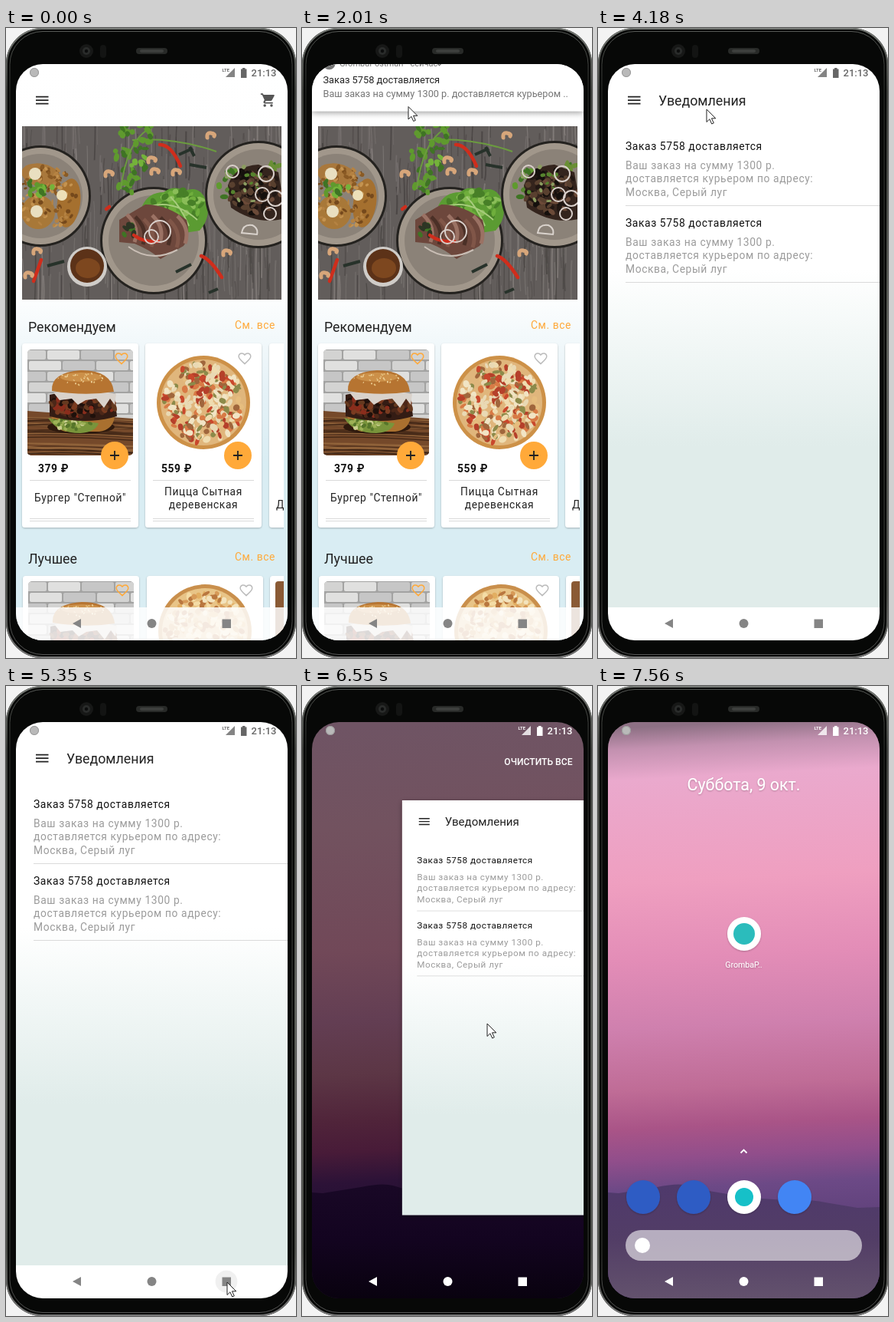
An HTML page for the animation above (8000 ms loop, 379 px wide and 821 px high).

```html
<!DOCTYPE html>
<html lang="ru">
<head>
<meta charset="utf-8">
<style>
html, body { margin: 0; width: 100%; height: 100%; overflow: hidden; background: #f3f3f3 }
svg { display: block; font-family: Roboto, sans-serif }
.body { font-size: 13.8px; letter-spacing: .62px }
.head { font-size: 17.8px }
.mid { text-anchor: middle }
</style>
</head>
<body>
<svg id="stage" width="379" height="821" viewBox="0 0 379 821"></svg>
<script>
let seed = 7;
const rnd = (a, b) => a + (b - a) * (seed = seed * 16807 % 2147483647) / 2147483647;
const pick = list => list[Math.floor(rnd(0, list.length))];
const many = (n, f) => Array.from({ length: n }, (_, i) => f(i)).join('');
const rect = (x, y, w, h, fill, more = '') => `<rect x="${x}" y="${y}" width="${w}" height="${h}" fill="${fill}" ${more}/>`;
const dot = (x, y, r, fill, more = '') => `<circle cx="${x}" cy="${y}" r="${r}" fill="${fill}" ${more}/>`;
const oval = (x, y, rx, ry, fill, turn = 0) => `<ellipse rx="${rx}" ry="${ry}" fill="${fill}" transform="translate(${x} ${y}) rotate(${turn})"/>`;
const path = (d, fill, more = '') => `<path d="${d}" fill="${fill}" ${more}/>`;
const line = (d, color, w = 1, more = '') => path(d, 'none', `stroke="${color}" stroke-width="${w}" ${more}`);
const text = (x, y, s, cls, fill, more = '') => `<text x="${x}" y="${y}" class="${cls}" fill="${fill}" ${more}>${s}</text>`;
const fade = (id, y1, y2, tilt, ...stops) => `<linearGradient id="${id}" gradientUnits="userSpaceOnUse" x1="0" x2="0" y1="${y1}" y2="${y2}" gradientTransform="rotate(${tilt} 190 420)">` +
  stops.map(([y, c]) => `<stop offset="${(y - y1) / (y2 - y1)}" stop-color="${c}"/>`).join('') + '</linearGradient>';
const group = (id, s, more = '') => `<g id="${id}" ${more}>${s}</g>`;
// Small flecks spread over a disc
const scatter = (n, x, y, rx, ry, size, colors) => many(n, () => {
  const a = rnd(0, 6.283), r = Math.sqrt(rnd(0, 1));
  return oval(x + rx * r * Math.cos(a), y + ry * r * Math.sin(a), rnd(.5, 1) * size, rnd(.3, .7) * size, pick(colors), rnd(0, 180));
});

const orange = '#ffa939', round = 'stroke-linecap="round"';

const defs = `<defs>
${fade('homeBg', 47, 798, 0, [47, '#fff'], [350, '#fdfefe'], [470, '#e6f2f7'], [570, '#d9edf3'], [798, '#d9edf3'])}
${fade('pageBg', 47, 755, 0, [47, '#fff'], [315, '#fff'], [400, '#f3f8f7'], [545, '#e0ecea'], [755, '#e0ecea'])}
${fade('dusk', 47, 798, -3, [47, '#6f5464'], [180, '#72525f'], [340, '#714858'], [430, '#633e53'], [500, '#5c3645'], [560, '#50243a'], [600, '#481b38'], [640, '#2c1237'], [680, '#231033'])}
${fade('duskHill', 648, 798, 0, [648, '#190826'], [720, '#130420'], [798, '#09020f'])}
${fade('dawn', 47, 798, -3, [47, '#8d7084'], [75, '#c391b0'], [115, '#eaa9cd'], [250, '#ef9fc0'], [350, '#e38db7'], [440, '#cf80ae'], [520, '#bf6c96'], [570, '#a95487'], [610, '#914e8b'], [650, '#6c4986'], [690, '#62437d'])}
${fade('dawnHill', 648, 798, 0, [648, '#4f396c'], [720, '#523d66'], [798, '#63526d'])}
<linearGradient id="metal" x1="0" x2="0" y1="0" y2="1"><stop offset="0" stop-color="#777a76"/><stop offset=".1" stop-color="#3b3d39"/><stop offset=".5" stop-color="#5d605a"/><stop offset=".9" stop-color="#4a4c47"/><stop offset="1" stop-color="#777"/></linearGradient>
<clipPath id="screenClip"><rect x="13" y="47" width="355" height="751" rx="35"/></clipPath>
<clipPath id="listClip"><rect x="13" y="47" width="350" height="751"/></clipPath>
<clipPath id="heroClip"><rect x="21" y="128" width="339" height="226"/></clipPath>
<clipPath id="photoClip"><rect x="28" y="419" width="138" height="138" rx="5"/></clipPath>
<clipPath id="navClip"><rect x="13" y="755" width="355" height="43"/></clipPath>
<clipPath id="crop"><rect id="cropBox" x="13" width="355"/></clipPath>
<filter id="soft" x="-20%" y="-20%" width="140%" height="140%"><feDropShadow dx="0" dy="1" stdDeviation="1.2" flood-opacity=".25"/></filter>
<filter id="deep" x="-20%" y="-20%" width="140%" height="140%"><feDropShadow dx="0" dy="2" stdDeviation="4" flood-opacity=".4"/></filter>
</defs>`;

// Hero picture
const plate = (x, y, r) => dot(x, y, r, '#24221f') + dot(x, y, r - 3, '#a1978b') + dot(x, y, r - 11, '#8b8278');
const cashew = (x, y) => line(`M${x - 4} ${y + 3}q-1-7 5-6t4 4`, '#d7a67a', 5, round);
const chili = d => line(d, '#cf2d1c', 4.5, round);
const leaf = (x, y, c = '#5f9a2e') => many(8, i => oval(x + rnd(-10, 10), y + rnd(-8, 8), rnd(3, 6), rnd(2, 4), i % 3 ? c : '#3f7424', i * 40));
const ring = (x, y, r) => dot(x, y, r, 'none', 'stroke="#d9cfca" stroke-width="2"');
const hero = `<g clip-path="url(#heroClip)">${rect(21, 128, 339, 226, '#625d5b')}
${many(260, () => line(`M${rnd(21, 360)} ${rnd(100, 340)}q${rnd(-3, 3)} 20 0 ${rnd(20, 90)}`, pick(['#413d3b', '#4d4846', '#7a7472', '#8a8481']), rnd(.6, 2.2), 'opacity=".65"'))}
${plate(45, 219, 66)}${oval(46, 192, 26, 15, '#a9783c', 12)}${oval(42, 240, 22, 22, '#a87838', 20)}${oval(82, 228, 15, 32, '#a5702f', 8)}
${scatter(110, 55, 222, 38, 42, 4, ['#8a5a24', '#c49350', '#b58242', '#75491c'])}
${leaf(40, 208)}${leaf(52, 212, '#74b23a')}${dot(38, 190, 8, '#e9dfc0')}${dot(40, 239, 8, '#e9dfc0')}${dot(73, 218, 7, '#ede0b8')}
${plate(193, 277, 70)}
${path('M178 232q8-18 28-18q12-10 28-2q22-8 29 18q4 18-10 34l-26 4z', '#5b9b32')}${scatter(50, 225, 232, 34, 20, 7, ['#6fae3c', '#8abd58', '#477f27'])}${line('M190 232q30-8 60 18M215 220q14 14 24 38', '#a6cc7b', 2)}
${path('M148 250l34-20q28 0 54 20q6 22-4 34l-30 17q-14-12-34-20l-20-2z', '#6d473c')}
${many(7, i => line(`M${158 + i * 11} ${243 + i * 3 % 8}q17 16 10 36`, ['#9b7264', '#4b3027', '#805648'][i % 3], 5))}
${leaf(158, 262, '#2d3524')}${chili('M167 270q14 10 32 8')}${ring(201, 265, 14)}${ring(190, 272, 9)}${line('M160 285q30 22 64 4', '#c9beb5', 2)}
${plate(330, 217, 70)}
${leaf(292, 195)}${leaf(288, 213)}${leaf(347, 186, '#6a8f35')}${path('M290 205q8-25 40-27l26 10l10 60q-38 10-72-14z', '#34241d')}
${scatter(90, 327, 212, 36, 30, 6, ['#59402f', '#211713', '#6b4a38', '#15100d'])}${scatter(18, 310, 205, 30, 24, 4, ['#56832e', '#8b9c60'])}
${ring(340, 190, 10)}${ring(335, 217, 9)}${ring(352, 222, 10)}${ring(296, 187, 8)}${ring(345, 242, 8)}${path('M308 267q2-12 14-10q8 4 6 12z', 'none', 'stroke="#d9d2cc" stroke-width="2"')}
${dot(106, 311, 26, '#cfccc8')}${dot(106, 310, 22, '#5c3218')}${oval(107, 313, 16, 13, '#7d471f')}
${leaf(153, 163)}${leaf(162, 188)}${leaf(174, 176, '#74b23a')}${leaf(156, 207)}${line('M150 210q8-62 36-78M165 146q55-4 110 15', '#6b9b3f', 2)}${leaf(157, 134)}${leaf(178, 152)}${leaf(182, 134)}
${chili('M201 152q15 0 27 28')}${chili('M255 297q12 4 27 28')}${chili('M46 302l-10 28')}${chili('M131 236l4-3')}
${line('M226 165l18-8M240 155l6 12M240 178l22 4M222 318l20-10M265 345l12-5M54 310l22-6', '#27322a', 4)}
${cashew(267, 140)}${cashew(222, 188)}${cashew(194, 187)}${cashew(190, 172)}${cashew(288, 293)}${cashew(40, 291)}${cashew(29, 322)}${cashew(134, 190)}</g>`;

// Dishes
const burger = `<g clip-path="url(#photoClip)">${rect(28, 419, 138, 138, '#a3a3a2')}
${many(28, i => { const row = i >> 2; return rect(10 + (i & 3) * 44 + row % 2 * 20, 420 + row * 14, 42, 12, ['#d3d3d2', '#e0e0df', '#c6c6c6'][i % 3], 'rx="2"'); })}
${path('M28 499l138 10v48h-138z', '#75492a')}${many(30, () => line(`M28 ${rnd(506, 556)}q60 ${rnd(-5, 5)} 138 4`, pick(['#4f301c', '#94663c', '#3f2515']), 1.3))}
${oval(98, 520, 44, 9, '#2e190d')}${path('M59 503h83q0 20-20 23h-44q-18-4-19-23z', '#a9702f')}
${path('M55 508q20 6 36 3l30 4q-4 12-24 13q-30 0-42-20z', '#79943b')}${scatter(30, 85, 516, 26, 8, 4, ['#9db156', '#56752a', '#c9cf8e'])}
${path('M57 478q42-10 85 2l3 26q-40 12-88 0z', '#341c14')}
${scatter(90, 100, 492, 42, 15, 6, ['#4c2718', '#1f100b', '#7a3b20', '#8a2d1c', '#65391f'])}
${path('M62 475q42-8 82 2l-2 14l-6-8l-8 12l-10-12l-14 2l-10 6l-8-8l-16 2z', '#d9d2cb')}
${path('M60 473q-2-24 38-27q40 0 43 28q-38 6-81-1z', '#b67431')}${oval(98, 455, 27, 6, '#cc9049')}
${scatter(30, 98, 457, 30, 8, 1.6, ['#f0d49c', '#e5c07c'])}</g>`;
const pizza = (x, y, crust, cheese, colors) => dot(x, y, 61, crust) + dot(x, y, 56, cheese) + scatter(260, x, y, 52, 52, 6, colors);

const heart = (x, y, c) => path('M12 20.6 10.6 19.3C5.4 14.6 2 11.5 2 8.1A5 5 0 0 1 7 3c1.9 0 3.8 .9 5 2.6A6.2 6.2 0 0 1 17 3a5 5 0 0 1 5 5.1c0 3.4-3.4 6.5-8.6 11.2z', 'none', `stroke="${c}" stroke-width="1.9" transform="translate(${x - 9.4} ${y - 9.4}) scale(.78)"`);
const box = (x, y) => rect(x, y, 152, 240, '#fff', 'rx="4" filter="url(#soft)"');
const details = (x, price, names) => dot(x + 121, 557, 18, orange) + line(`M${x + 115} 557h12m-6-6v12`, '#222', 1.8) +
  text(x + 21, 579, price + ' ₽', 'body', '#111', 'font-weight="700"') +
  line(`M${x + 10} 589.5h132M${x + 10} 639.5h132m0 3h-132`, '#d9d9d9') +
  names.map((s, i) => text(x + 76, (names.length > 1 ? 609 : 617) + i * 17.3, s, 'body mid', '#222')).join('');
const section = (y, s) => text(29, y, s, 'head', '#222') + text(299, y - 4, 'См. все', 'body', orange);

const menu = line('M39 89.7h16.5m0 4.5h-16.5m0 4.5h16.5', '#222', 1.7);
const cart = path('M7 18a2 2 0 1 0 0 4 2 2 0 0 0 0-4zM1 2v2h2l3.6 7.6-1.35 2.45C4.5 15.4 5.5 17 7 17h12v-2H7.4l1.1-2h7.45a2 2 0 0 0 1.75-1L21.3 5.5A1 1 0 0 0 20.4 4H5.2L4.3 2zM17 18a2 2 0 1 0 0 4 2 2 0 0 0 0-4z', '#555', 'transform="translate(332 83.5) scale(.88)"');

const home = rect(13, 47, 355, 751, 'url(#homeBg)') + menu + cart + hero + section(396, 'Рекомендуем') + section(698, 'Лучшее') +
  `<g clip-path="url(#listClip)">${box(21, 411)}${group('burger', burger)}${heart(151, 431, orange)}${details(21, 379, ['Бургер "Степной"'])}
  ${box(182, 411)}${pizza(258, 488, '#cd9148', '#e0b67c', ['#b5402a', '#c9482c', '#e9d9b4', '#a0663c', '#d87a45', '#f1e4c4', '#8c8a4a', '#e6bd7e', '#efdcb0'])}${heart(312, 431, '#bbb')}${details(182, 559, ['Пицца Сытная', 'деревенская'])}
  ${box(344, 411)}${text(353, 626.3, 'Домашняя', 'body', '#222')}
  ${box(22, 714)}<use href="#burger" x="1" y="302"/>${heart(152, 733, orange)}
  ${box(184, 714)}${pizza(260, 786, '#c98f4c', '#e8c487', ['#f4dca6', '#e2ae62', '#f3e3bd', '#d79a58', '#b9773f'])}${heart(314, 733, '#bbb')}
  ${box(345, 714)}${rect(352, 721, 30, 90, '#8a5a35', 'rx="4"')}</g>` + rect(13, 755, 355, 43, '#fff', 'opacity=".84"');

const notice = rect(13, 40, 355, 91, '#fff', 'filter="url(#deep)"') + dot(35.5, 69, 8, '#757575') +
  text(49, 73, 'GrombaPostman • сейчас', '', '#757575', 'font-size="11"') + line('M176.5 68.5l3 3 3-3', '#757575', 1.3) +
  text(27.5, 95, 'Заказ 5758 доставляется', '', '#222', 'font-size="12.8"') +
  text(27.5, 113, 'Ваш заказ на сумму 1300 р. доставляется курьером ..', '', '#757575', 'font-size="12.7"');

const order = y => text(36, y + 4.7, 'Заказ 5758 доставляется', 'body', '#111') +
  ['Ваш заказ на сумму 1300 р.', 'доставляется курьером по адресу:', 'Москва, Серый луг'].map((s, i) => text(36, y + 30 + i * 17.3, s, 'body', '#9b9b9b')).join('') +
  line(`M36 ${y + 77.5}h332`, '#dadada');
const page = rect(13, 47, 355, 708, 'url(#pageBg)') + menu + text(79, 101, 'Уведомления', 'head', '#222') + order(154) +
  group('second', order(254)) + dot(348, 254.5, 4.7, orange, 'id="unread"');

const hill = 'M13 660l14 1 50-8q28-6 42-2l20 6 30 5 30 5 46 3q34-1 52 3l42 7 29-1v119h-355z';
const wall = name => rect(13, 47, 355, 751, `url(#${name})`) + path(hill, `url(#${name}Hill)`);
const recents = wall('dusk') + text(353.5, 102.5, 'ОЧИСТИТЬ ВСЕ', '', '#fff', 'font-size="12.1" font-weight="500" text-anchor="end"');
const launcher = wall('dawn') + `<g filter="url(#soft)">${text(190.5, 136, 'Суббота, 9 окт.', 'mid', '#fff', 'font-size="21.4"')}
  ${text(190.5, 367, 'GrombaP..', 'mid', '#fff', 'font-size="10.6"')}${dot(191, 323, 22, '#fff')}${dot(59, 666, 22, '#2f5bc4')}${dot(125, 666, 22, '#2f5bc4')}${dot(191, 666, 22, '#fff')}${dot(257, 666, 22, '#4285f4')}</g>
  ${dot(191, 323, 14, '#2bbcbc')}${dot(191, 666, 12, '#16c0c8')}${line('M186.5 608.5l4-4 4 4', '#fff', 1.8)}
  ${rect(36, 709, 309, 40, '#fff', 'rx="20" opacity=".58"')}${dot(58, 729, 10, '#fff')}`;

const status = dot(37, 58, 6, '#b9b9b9') + dot(37, 58, 5.5, 'none', 'stroke="#999"') +
  `<g id="status"><text x="282.5" y="57" font-size="5.8" font-weight="700">LTE</text>
  <path d="M299 52v12h-12z" opacity=".8"/><path d="M307 53.5h2v-1.5h3.5v1.5h2v11.5h-7.5z"/>
  <text x="320.5" y="63" font-size="13" font-weight="500">21:13</text></g>`;
const nav = '<g id="nav"><path d="M87 776l11-6v12z"/><circle cx="190.5" cy="776" r="6"/><path d="M282.5 770.5h11.5v11.5h-11.5z"/></g>';

const phone = rect(0, 0, 379, 821, '#070807', 'rx="47"') + rect(1, 1, 377, 819, 'none', 'rx="46" stroke="url(#metal)" stroke-width="2"') +
  rect(5, 4.5, 369, 812, 'none', 'rx="43" stroke="url(#metal)" opacity=".7"') + dot(105, 30, 9, '#171817') + dot(105, 30, 5, '#2a2c2b') + dot(105, 30, 2.2, '#0c0d0d') +
  rect(123, 22, 8, 17, '#131413', 'rx="4"') + rect(170, 26, 41, 8, '#282a28', 'rx="4"') + rect(175, 28, 31, 4, '#3d3f3d', 'rx="2"');

const stage = document.getElementById('stage');
stage.innerHTML = defs + phone + '<g clip-path="url(#screenClip)">' + group('home', home) + group('notice', notice) + group('recents', recents) +
  rect(13, 755, 355, 43, '#fff', 'id="navBar"') + group('page', group('cropped', page, 'clip-path="url(#crop)"')) +
  group('launcher', launcher) + group('top', status) + `<g clip-path="url(#navClip)">${dot(288, 776, 1, '#000', 'id="ripple"')}</g>` + nav + '</g>' +
  path('M0 0v16.5l3.9-3.7 2.8 6.2 2.6-1.2-2.8-6h5.3z', '#fff', 'id="cursor" stroke="#222"');

const el = id => document.getElementById(id);
const set = (id, attrs) => { for (const k in attrs) el(id).setAttribute(k, attrs[k]); };
const show = (id, a) => set(id, { opacity: a, visibility: a > 0 ? 'visible' : 'hidden' });

// Smooth value between keys [time, value]
function at(t, ...keys) {
  if (t <= keys[0][0]) return keys[0][1];
  for (let i = 1; i < keys.length; i++) {
    const [a, u] = keys[i - 1], [b, v] = keys[i];
    if (t <= b) { const p = (t - a) / (b - a); return u + (v - u) * p * p * (3 - 2 * p); }
  }
  return keys[keys.length - 1][1];
}

// The picture advances in steps of 70 ms from each of these moments
const marks = [0, 500, 640, 910, 1400, 1880, 2430, 3300, 4180, 4950, 5010, 5350, 5770, 6480, 6830, 7430, 7560];
const stepped = t => { const m = marks.filter(v => v <= t).pop(); return m + Math.floor((t - m) / 70) * 70; };

function draw() {
  const t = stepped(performance.now() % 8000), dark = t >= 5770;
  show('home', t < 2400 ? 1 : 0);
  show('notice', t >= 500 && t < 2150 ? 1 : 0);
  set('notice', { transform: `translate(0 ${at(t, [500, -83], [600, -83], [850, 0], [1880, 0], [2100, -95])})` });

  const opened = at(t, [1950, 0], [2300, 1]);
  show('page', t < 6830 ? opened : 0);
  show('navBar', dark ? 0 : opened);
  const s = at(t, [5700, 1], [5910, .944], [6200, .848]);
  const y0 = at(t, [5700, 47], [5910, 61.5]), y1 = at(t, [5700, 755], [5910, 699]);
  const cy = at(t, [1950, 420], [2300, 380], [5700, 380], [5910, 419]);
  const dx = at(t, [6410, 0], [6830, 350]);
  set('page', { transform: `translate(${190.5 + dx} ${cy}) scale(${s}) translate(-190.5 -380)`, filter: dark ? 'url(#deep)' : 'none' });
  set('cropBox', { y: y0, height: y1 - y0 });
  show('unread', t < 3300 ? opened : 0);
  el('second').firstChild.setAttribute('fill', t < 3300 ? orange : '#111');

  show('recents', dark ? 1 : 0);
  show('launcher', at(t, [7360, 0], [7560, 1]));
  set('status', { fill: dark ? '#fff' : '#666' });
  set('nav', { fill: !dark ? '#858585' : t < 6000 ? '#e6dfe1' : '#fff' });
  show('top', t >= 640 && t < 2000 ? 0 : 1);
  show('ripple', at(t, [5280, 0], [5420, .12], [5560, .12], [5700, 0]));
  set('ripple', { r: at(t, [5280, 8], [5560, 49]) });

  show('cursor', t >= 700 && t < 6740 ? 1 : 0);
  const x = at(t, [700, 7], [910, 33], [1400, 139], [4110, 139], [4950, 289], [5700, 289], [5910, 271], [6340, 170], [6410, 170], [6740, 356]);
  const y = at(t, [700, 735], [910, 123], [1400, 108], [1470, 102.5], [4110, 102.5], [4180, 106], [4950, 772], [5010, 772], [5150, 777], [5700, 777], [5910, 702], [6340, 440]);
  set('cursor', { transform: `translate(${x} ${y})` });
  requestAnimationFrame(draw);
}
draw();
</script>
</body>
</html>
```
